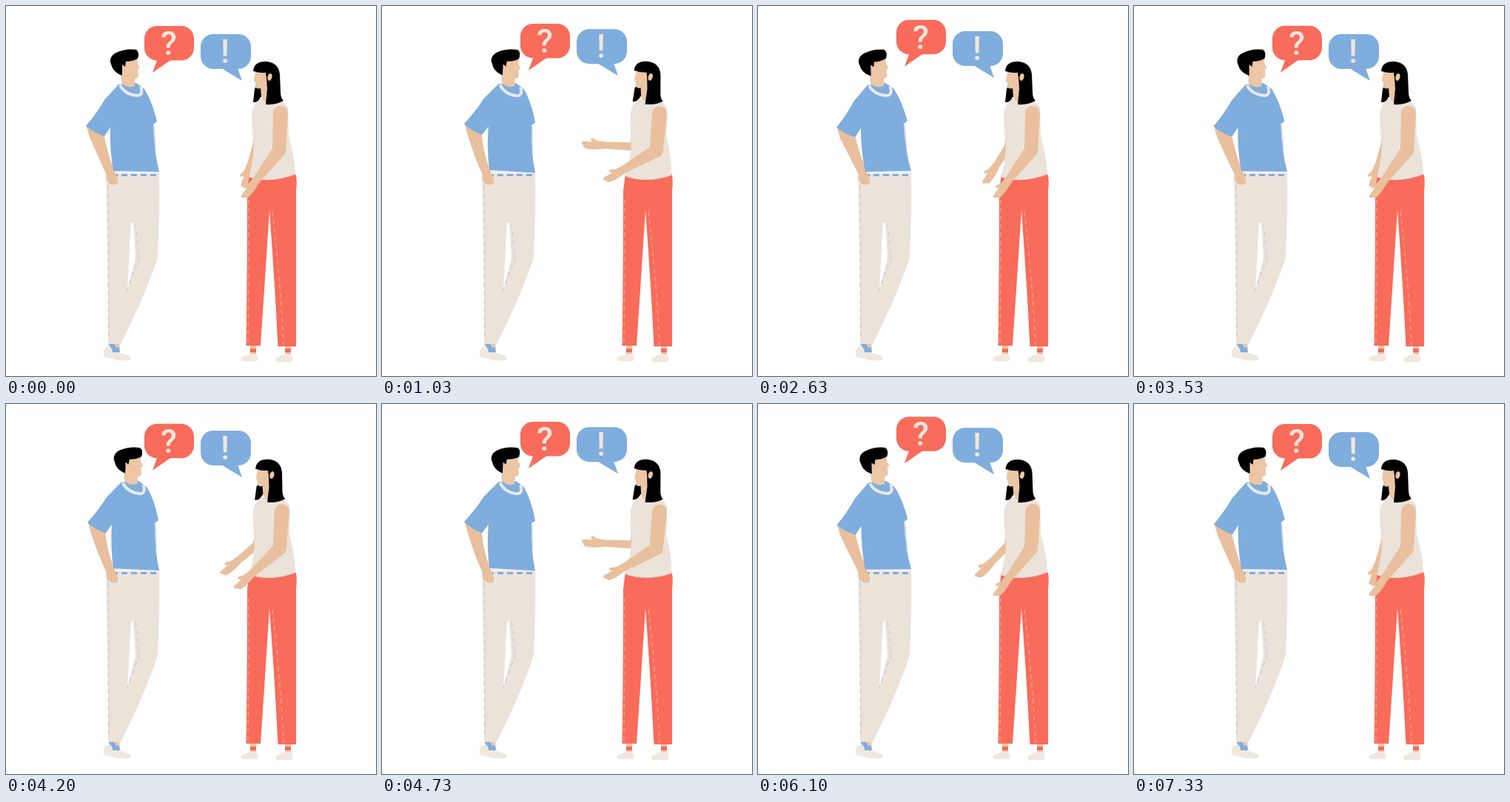
An HTML page with a canvas for the animation above (7410 ms loop, 500 px wide and 500 px high).

```html
<!DOCTYPE html>
<html lang="en">
<head>
<meta charset="utf-8">
<title>Conversation</title>
<style>
html, body { margin: 0; width: 100%; height: 100%; overflow: hidden; background: #fff; }
canvas { display: block; }
</style>
</head>
<body>
<canvas id="c" width="500" height="500"></canvas>
<script>
const ctx = document.getElementById('c').getContext('2d');
const LOOP = 7410, CYCLE = 74;
const BLUE = '#7faddd', RED = '#f96b5a', BEIGE = '#ebe3da', SKIN = '#ecc6a5',
      TAN = '#e9bf9d', GREY = '#d2d3d6', PINK = '#f3a191';

const fill = (d, color) => { ctx.fillStyle = color; ctx.fill(new Path2D(d), 'evenodd'); };

function line(d, color, width, dash = []) {
  ctx.strokeStyle = color;
  ctx.lineWidth = width;
  ctx.setLineDash(dash);
  ctx.stroke(new Path2D(d));
  ctx.setLineDash([]);
}

function turned(x, y, angle, draw) {
  ctx.save();
  ctx.translate(x, y);
  ctx.rotate(angle);
  ctx.translate(-x, -y);
  draw();
  ctx.restore();
}

function spin([x, y], [px, py], a) {
  const c = Math.cos(a), s = Math.sin(a), dx = x - px, dy = y - py;
  return [px + dx * c - dy * s, py + dx * s + dy * c];
}

const mix = (a, b, k) => a + (b - a) * k;
const ease = x => 0.5 - 0.5 * Math.cos(Math.PI * Math.min(1, Math.max(0, x)));

// Rises from start to peak, then returns by end.
const pulse = (f, start, peak, end) =>
  f < peak ? ease((f - start) / (peak - start)) : 1 - ease((f - peak) / (end - peak));

// Tapered limb through [x, y, radius] joints.
function limb(joints, color) {
  ctx.fillStyle = color;
  joints.forEach(([x, y, r], i) => {
    ctx.beginPath();
    ctx.arc(x, y, r, 0, Math.PI * 2);
    ctx.fill();
    if (!i) return;
    const [px, py, pr] = joints[i - 1];
    const len = Math.hypot(x - px, y - py);
    const nx = (py - y) / len, ny = (x - px) / len;
    ctx.beginPath();
    ctx.moveTo(px + nx * pr, py + ny * pr);
    ctx.lineTo(x + nx * r, y + ny * r);
    ctx.lineTo(x - nx * r, y - ny * r);
    ctx.lineTo(px - nx * pr, py - ny * pr);
    ctx.fill();
  });
}

function forearm(x, y, degrees, length, r0, r1, color) {
  const angle = degrees * Math.PI / 180;
  const wx = x - Math.cos(angle) * length, wy = y + Math.sin(angle) * length;
  limb([[x, y, r0], [wx, wy, r1]], color);
  ctx.save();
  ctx.translate(wx, wy);
  ctx.rotate(-angle);
  fill('M2 -5L-8 -6L-13 -9Q-17 -9 -16 -6L-13 -4L-27 -4Q-30 -2 -27 0L-24 5Q-16 7 -8 6L2 5Z', color);
  ctx.restore();
}

function bubble(x, y, w, h, tail, color, mark, mx) {
  ctx.fillStyle = color;
  ctx.beginPath();
  ctx.roundRect(x, y, w, h, 17);
  ctx.fill();
  ctx.save();
  ctx.translate(x, y);
  fill(tail, color);
  ctx.restore();
  ctx.fillStyle = '#f0e6dc';
  ctx.font = '500 45px Roboto, Arial, sans-serif';
  ctx.textAlign = 'center';
  ctx.fillText(mark, mx, y + 39);
}

function man(a) {
  fill('M134 462Q139 459 146 458L153 468L167 473Q171 478 166 479L149 479Q144 476 135 475Q129 473 134 462Z', '#f0e8df');
  fill('M145 454H154L153 463H146Z', SKIN);
  fill('M138 457L145 456L150 463L143 463Z', BLUE);
  fill('M143 463L153 461L154 468L144 468Z', BLUE);
  fill('M135 222L207 223Q208 280 205 340Q190 385 168 430L155 457L138 456Q138 340 135 222Z' +
       'M169 293L164 384L175 340L172 293Z', BEIGE);
  line('M138 242L139 450M175 295L180 340L163 385', GREY, 2, [6, 5]);
  line('M146 224.5H206', '#f1f0ee', 4);
  line('M143 228.5H206', BLUE, 3, [8, 5]);

  // The hand stays in the pocket while the shoulder sways.
  const pivot = [172, 226];
  const [p, q] = [[109, 163], [132, 171]].map(v => spin(v, pivot, a));
  fill(`M${p}L${q}Q136 196 146 222Q153 236 151 240Q147 243 140 240Q134 234 136 228Q126 208 ${p[0] + 4} ${p[1] + 14}Z`, TAN);

  turned(...pivot, a, () => {
    line('M200 162L202 195', '#dcdde2', 2);
    fill('M152 106Q142 117 133 127Q122 146 108 162Q118 171 133 176L141 164Q140 195 145 223L207 224' +
         'Q200 197 199 160L204 156Q198 130 187 112L176 104Z', BLUE);
    fill('M155 84L159 74L177 71L178 78L181 84L178 86L179 94Q178 98 174 98L174 108Q164 112 156 104Z', SKIN);
    line('M154 107Q161 120 178 121Q186 120 182 109', '#e8e8ea', 4);
    fill('M141 76Q140 67 149 63Q162 57 176 59Q181 63 178 71Q171 75 162 75L161 82L157 79L157 94Q148 91 144 84Z', '#000');
  });
}

function woman(f) {
  const lean = pulse(f, 0, 21, 54) * 0.046;
  const reach = pulse(f, 0, 22, 66);
  const lift = pulse(f, 0, 21, 45);
  const pivot = [360, 232];

  const [ex, ey] = spin([338, 191], pivot, lean);
  limb([[...spin([344, 145], pivot, lean), 7], [ex, ey, 5]], TAN);
  forearm(ex, ey, mix(72, -3, reach), mix(28, 42, reach), 5.5, 4.5, TAN);

  for (const x of [334, 381]) {
    ctx.fillStyle = SKIN;
    ctx.fillRect(x - 4, 458, 8, 14);
    ctx.fillStyle = RED;
    ctx.fillRect(x - 4, 463, 8, 5);
  }
  fill('M330 470H339Q342 479 338 480H319Q314 475 323 473ZM377 470H386Q389 479 386 481H366Q361 476 370 473Z', '#f0e8df');
  fill('M329 226H391Q394 234 392 250V460H367.5Q363 370 356 276Q350 370 344 459H324.5Q326 350 326 250Z', RED);
  line('M328 262L327 456M360 278Q371 370 375 458', PINK, 1.4, [6, 5]);

  turned(...pivot, lean, () => {
    fill('M341 105L336 112L334 130Q340 131 343 125L352 112Z', '#000');
    fill('M344 126Q333 133 332 146Q332 168 335 188Q335 207 328 231Q358 240 391 227' +
         'Q390 203 382 176L381 137Q376 128 365 127Z', BEIGE);
    line('M329 231Q358 240 391 227', '#d9d3cd', 1.2);
    fill('M338 84L336 95L335 101L337 104V109Q339 113 344 111L345 122Q348 130 352 130L361 112L357 86Z', SKIN);
    fill('M334 88Q335 75 351 75Q368 76 370 92L371 116Q371 124 375 128Q365 134 351 133' +
         'L353 112L352 97L351 90Q343 91 334 88Z', '#000');
    ctx.fillStyle = SKIN;
    ctx.beginPath();
    ctx.ellipse(356.5, 96, 3, 5, 0.25, 0, Math.PI * 2);
    ctx.fill();
  });

  const [sx, sy] = spin([371, 145], pivot, lean);
  const [nx, ny] = spin([369, 195], pivot, lean);
  limb([[sx, sy, 10], [nx, ny, 9]], TAN);
  forearm(nx, ny, mix(53, 30, lift), 53, 9, 5, TAN);
}

function draw(f) {
  ctx.fillStyle = '#fff';
  ctx.fillRect(0, 0, 500, 500);
  const sway = Math.cos((f - 20) / CYCLE * Math.PI * 2);
  man((sway + 0.127) * 0.04);
  woman(f);
  bubble(187, 27 - 10 * pulse(f, 7, 45, 74), 67, 46.5, 'M18 44L11 63L37 45Z', RED, '?', 220);
  bubble(263, 38 - 9.3 * pulse(f, 0, 32, 70), 68, 47, 'M28 46L56 63L49 43Z', BLUE, '!', 296);
}

// Steps alternate between 30 ms and 70 ms.
function tick() {
  const t = performance.now() % LOOP;
  const step = Math.min(147, 2 * Math.floor(t / 100) + (t % 100 >= 30 ? 1 : 0));
  draw(step % CYCLE);
  requestAnimationFrame(tick);
}
tick();
</script>
</body>
</html>
```
